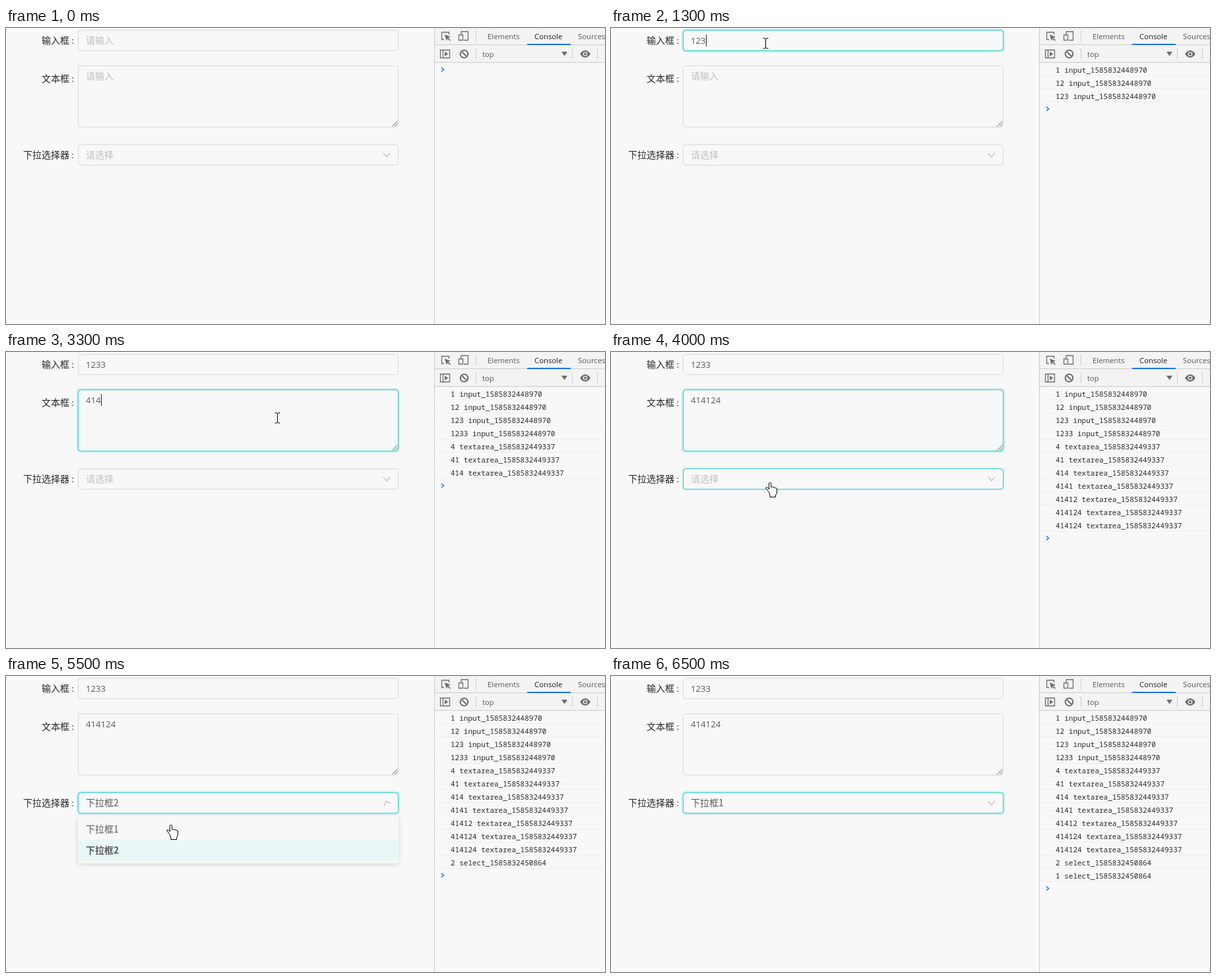
Write an HTML page that moves like this. It is 908x450 px and loops after 7100 ms.

```html
<!DOCTYPE html>
<html lang="zh">
<head>
<meta charset="utf-8">
<style>
html, body { margin: 0; width: 100%; height: 100%; overflow: hidden; background: #f8f8f8; }
svg { display: block; }
text { font: 14px "Noto Sans CJK SC", "Noto Sans CJK", sans-serif; fill: #5a5a5a; white-space: pre; }
.label { fill: #262626; text-anchor: end; }
.hint { fill: #bfbfbf; }
.value { font: 13.2px "Open Sans", sans-serif; }
.tab { font: 11.3px "Open Sans", sans-serif; fill: #5a5a5a; }
.log text { font: 11px "Noto Sans Mono", monospace; fill: #2a2a2a; }
.field { fill: none; stroke: #d9d9d9; }
.glow { fill: none; stroke: #13c2c2; stroke-opacity: .22; stroke-width: 2.5; }
.focus { fill: none; stroke: #36cfc9; }
.rule { stroke: #ccc; fill: none; }
.icon { stroke: #6e6e6e; fill: none; stroke-width: 1.3; }
.solid { fill: #6e6e6e; }
#menu { filter: drop-shadow(0 2px 4px rgba(0,0,0,.15)); }
.cursor path { stroke: #000; fill: #fff; stroke-linejoin: round; }
</style>
</head>
<body>
<svg width="908" height="450" viewBox="0 0 908 450">
  <text class="label" x="96" y="24">输入框</text><text class="value label" x="103" y="24">:</text>
  <text class="label" x="96" y="82">文本框</text><text class="value label" x="103" y="82">:</text>
  <text class="label" x="96" y="198">下拉选择器</text><text class="value label" x="103" y="198">:</text>
  <g id="fields"></g>
  <path d="M585.5 149.5l8-8M589.5 149.5l4-4" stroke="#666"/>
  <text id="inputText" x="121" y="24"></text>
  <text id="areaText" x="121" y="78"></text>
  <text id="selectText" x="121" y="198"></text>
  <path id="chevron" d="M-5 -3L0 3L5 -3" fill="none" stroke="#bfbfbf" stroke-width="1.2"/>
  <path id="caret" d="M.5 0v18" stroke="#222"/>
  <g id="menu">
    <rect x="109" y="213" width="486" height="72" rx="4" fill="#f8f8f8"/>
    <rect id="row1" x="109" y="217" width="486" height="32"/>
    <rect id="row2" x="109" y="249" width="486" height="32"/>
    <text x="121" y="238">下拉框1</text>
    <text id="option2" x="121" y="270">下拉框2</text>
  </g>

  <rect x="650" width="258" height="52" fill="#f3f3f3"/>
  <path class="rule" d="M649.5 0V450M650 25.5H908M650 52.5H908M712.5 4v16M712.5 31v16M858.5 31v16M896.5 31v16"/>
  <rect x="790" y="24" width="66" height="2" fill="#1a73e8"/>
  <text class="tab" x="730" y="17">Elements</text>
  <text class="tab" x="801" y="17" style="fill:#222">Console</text>
  <text class="tab" x="867" y="17">Sources</text>
  <text class="tab" x="722" y="44">top</text>
  <path class="icon" d="M664 17.5H660.5V6.5H671.5V10M690 10V5.500H700.500V18.500H694M686.500 10.500H692.500V18.500H686.500Z"/>
  <path class="solid" d="M665 10l9 3.500-3.500 1.500 3.500 3.500-1.300 1.300-3.500-3.500-1.500 3.500z"/>
  <path class="icon" d="M658.500 33.500H672.500V45.500H658.500ZM662.500 33.500V45.500"/>
  <path class="solid" d="M665 36l5.500 3.500-5.500 3.500z"/>
  <path class="icon" style="stroke-width:2" d="M690 35l9 9M688.700 39.500a5.800 5.800 0 1 0 11.600 0a5.800 5.800 0 1 0-11.600 0"/>
  <path class="solid" d="M842 36h9l-4.500 6.500z"/>
  <path class="solid" d="M870 39.500q8-11 16 0q-8 11-16 0"/>
  <circle cx="878" cy="39.500" r="3.300" fill="#f3f3f3"/><circle class="solid" cx="878" cy="39.500" r="2"/>
  <g class="log" id="log"></g>
  <path id="prompt" d="M660 60l3.500 3-3.500 3" fill="none" stroke="#1a73e8" stroke-width="1.500"/>

  <g class="cursor">
    <path id="arrow" d="M0 0V16L4 12.500L6.500 18.500L9 17.500L6.500 11.500H11.500Z"/>
    <path id="beam" d="M-3.500 -7.500H-1L.5 -6.500L2 -7.500H4.500M.5 -6.500V7M-3.500 8H-1L.5 7L2 8H4.500" style="fill:none"/>
    <path id="hand" d="M-1.500 15L-6 9.500Q-6.500 7 -4 8L-1.500 10.500V1.500Q0 -1 1.700 1.500V7.500Q3.500 6 5 8Q7 6.800 8 8.800Q10.500 8 10.500 11V16L8.500 20V22.500H0V20Z"/>
  </g>
</svg>
<script>
const LOOP = 7100, STEP = 100;
const $ = id => document.getElementById(id);
const ramp = (t, start, length) => Math.min(1, Math.max(0, (t - start) / length));
const pulse = (t, [on, off, rise = 100, fall = 200]) => ramp(t, on, rise) - ramp(t, off, fall);
const easeOut = p => 1 - (1 - p) ** 3;

// Each change event: time, field, value
const events = [
  [1100, 'input', '1'], [1200, 'input', '12'], [1300, 'input', '123'], [1500, 'input', '1233'],
  [3000, 'textarea', '4'], [3100, 'textarea', '41'], [3300, 'textarea', '414'], [3400, 'textarea', '4141'],
  [3500, 'textarea', '41412'], [3600, 'textarea', '414124'], [4000, 'textarea', '414124'],
  [4700, 'select', '2'], [5900, 'select', '1']
];
const stamp = { input: '1585832448970', textarea: '1585832449337', select: '1585832450864' };

// Pointer path: time, x, y, shape until the next point
const path = [
  [100, 652, 104, 'arrow'], [200, 636, 110, 'arrow'], [300, 520, 95, 'beam'], [400, 382, 42, 'arrow'],
  [500, 311, 33, 'beam'], [600, 265, 26, 'beam'], [800, 234, 23, 'beam'], [1500, 234, 23, 'beam'],
  [1600, 244, 23, 'beam'], [1700, 267, 42, 'arrow'], [1800, 330, 75, 'beam'], [2000, 445, 105, 'beam'],
  [2300, 473, 110, 'beam'], [2600, 473, 109, 'beam'], [2900, 418, 100, 'beam'], [3000, 411, 100, 'beam'],
  [3600, 411, 100, 'beam'], [3700, 387, 116, 'beam'], [3800, 310, 160, 'arrow'], [3900, 245, 190, 'hand'],
  [4100, 237, 205, 'hand'], [4300, 235, 270, 'hand'], [4800, 235, 270, 'hand'], [5200, 249, 190, 'hand'],
  [5400, 249, 192, 'hand'], [5500, 250, 226, 'hand'], [5900, 250, 228, 'hand'], [6000, 290, 215, 'arrow'],
  [6200, 560, 130, 'arrow'], [6400, 852, 60, 'arrow'], [6500, 908, 20, 'none']
];

// y, height, hover spans and focus span
const fields = [
  { y: 3.5, h: 31, hover: [[450, 850], [1450, 1650]], focus: [800, 2500] },
  { y: 57.5, h: 93, hover: [[250, 350], [1750, 1750], [2150, 2600, 300]], focus: [2500, 4000, 100, 300] },
  { y: 177.5, h: 31, hover: [[3850, 4000]], focus: [3950, LOOP] }
];
$('fields').innerHTML = fields.map(({ y, h }) => {
  const box = (name, grow) => `<rect class="${name}" x="${109.5 - grow}" y="${y - grow}" width="${485 + 2 * grow}" height="${h + 2 * grow}" rx="${4 + grow}"/>`;
  return `<g>${box('field', 0)}${box('glow', 1.2)}${box('focus', 0)}</g>`;
}).join('');
fields.forEach((f, i) => [, f.glow, f.edge] = $('fields').children[i].children);

$('log').innerHTML = events.map(([, name, value], i) =>
  `<g><text x="674" y="${68 + 20 * i}">${value} ${name}_${stamp[name]}</text>` +
  `<path d="M650 ${72.5 + 20 * i}H908" stroke="#efefef"/></g>`).join('');
const lines = [...$('log').children];

function setText(id, value, hint, prefix = '') {
  const el = $(id);
  el.textContent = value ? prefix + value : hint;
  el.setAttribute('class', value ? (prefix ? '' : 'value') : 'hint');
}

function drawForm(t) {
  const done = events.filter(e => e[0] <= t);
  const latest = name => done.filter(e => e[1] === name).pop()?.[2] || '';
  setText('inputText', latest('input'), '请输入');
  setText('areaText', latest('textarea'), '请输入');
  setText('selectText', latest('select'), '请选择', '下拉框');
  lines.forEach((line, i) => line.style.display = i < done.length ? '' : 'none');
  $('prompt').setAttribute('transform', `translate(0 ${20 * done.length})`);

  for (const f of fields) {
    const focus = pulse(t, f.focus);
    f.glow.style.opacity = focus;
    f.edge.style.opacity = Math.max(focus, ...f.hover.map(h => pulse(t, h)));
  }

  const inArea = t >= 2600;
  const typed = latest(inArea ? 'textarea' : 'input');
  const since = t - Math.max(inArea ? 2600 : 900, done.length ? done[done.length - 1][0] : 0);
  const active = t >= 900 && t < 2500 || inArea && t < 4000;
  $('caret').style.display = active && since % 1000 < 500 ? '' : 'none';
  $('caret').setAttribute('transform', `translate(${Math.round(121 + 7.55 * typed.length)} ${inArea ? 64 : 10})`);
}

function drawMenu(t) {
  const again = t >= 5300;
  const [open, close] = again ? [5350, 5850] : [4050, 4650];
  const turn = easeOut(ramp(t, open, 300)) - easeOut(ramp(t, close, 300));
  const show = easeOut(ramp(t, open, 200)) - easeOut(ramp(t, close, 200));
  $('chevron').setAttribute('transform', `translate(577 193) rotate(${180 * turn})`);
  $('menu').style.opacity = show;
  $('menu').setAttribute('transform', `translate(0 213) scale(1 ${.8 + .2 * show}) translate(0 -213)`);
  const overFirst = again ? t > 5500 : t === 4200;
  $('row1').style.fill = overFirst ? '#e8fffa' : 'none';
  $('row2').style.fill = overFirst ? (again ? '#f4f4f4' : 'none') : again ? '#e9f9f7' : t > 4200 ? '#e8fffa' : 'none';
  $('option2').style.fontWeight = t >= 4700 ? 700 : 400;
}

function drawPointer(t) {
  const i = path.findLastIndex(p => p[0] <= t);
  const [t0, x0, y0, shape] = path[i] || [0, 0, 0, 'none'];
  const [t1, x1, y1] = path[i + 1] || [LOOP, x0, y0];
  const k = ramp(t, t0, t1 - t0);
  for (const id of ['arrow', 'beam', 'hand']) {
    $(id).style.display = id === shape ? '' : 'none';
    $(id).setAttribute('transform', `translate(${Math.round(x0 + (x1 - x0) * k)} ${Math.round(y0 + (y1 - y0) * k)})`);
  }
}

const start = performance.now();
function frame() {
  const t = Math.floor((performance.now() - start) % LOOP / STEP) * STEP;
  drawForm(t);
  drawMenu(t);
  drawPointer(t);
  requestAnimationFrame(frame);
}
frame();
</script>
</body>
</html>
```
